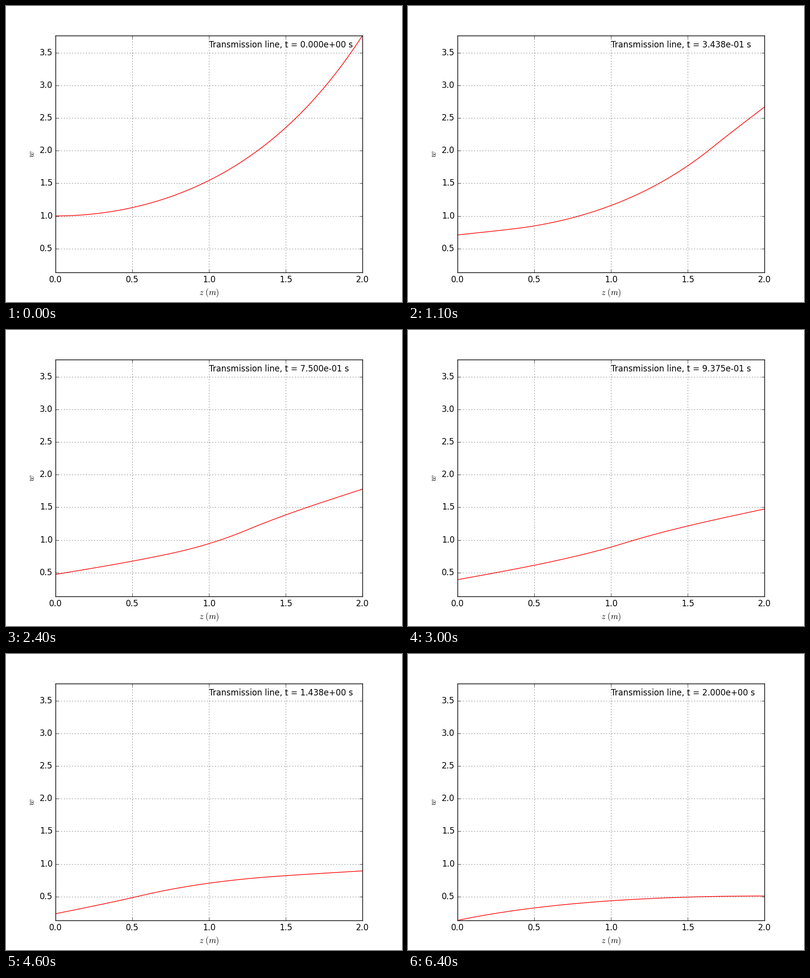
Write a matplotlib script that moves like this. It is 800x600 px and loops after 6500 ms.

```python
import numpy as np
import matplotlib.pyplot as plt
from matplotlib.animation import FuncAnimation

plt.style.use("classic")
plt.rcParams["font.family"] = "DejaVu Sans"

LENGTH = 2.0
T_END = 2.0
STEPS = 64
W_MAX = np.cosh(LENGTH)
W_MIN = np.exp(-T_END)

z = np.linspace(0, LENGTH, STEPS + 1)


def steady(x):
    return 1 + (W_MAX - 1) * x / LENGTH


def deviation(x):
    """Initial deviation, extended oddly about both ends of the line."""
    x = (x + LENGTH) % (2 * LENGTH) - LENGTH
    a = np.abs(x)
    return np.sign(x) * (np.cosh(a) - steady(a))


def wave(t):
    """Distortionless line: damped d'Alembert solution with fixed-shape ends."""
    v = steady(z) + (deviation(z + t) + deviation(z - t)) / 2
    return np.exp(-t) * v


fig = plt.figure(figsize=(8, 6), dpi=100, facecolor="white")
ax = fig.add_axes([0.125, 0.1, 0.775, 0.8])
ax.set_xlim(0, LENGTH)
ax.set_ylim(W_MIN, W_MAX)
ax.set_xticks(np.arange(0, 2.1, 0.5))
ax.set_yticks(np.arange(0.5, 3.6, 0.5))
ax.set_xlabel(r"$z\ (m)$")
ax.set_ylabel(r"$w$")
ax.grid(True)

line, = ax.plot(z, wave(0), "r-", lw=1)
label = ax.text(0.5, 0.95, "", transform=ax.transAxes)


def update(i):
    t = T_END * i / STEPS
    line.set_ydata(wave(t))
    label.set_text(f"Transmission line, t = {t:.3e} s")
    return line, label


anim = FuncAnimation(fig, update, frames=STEPS + 1, interval=100,
                     init_func=lambda: update(0), repeat=True, repeat_delay=0)
plt.show()
```
